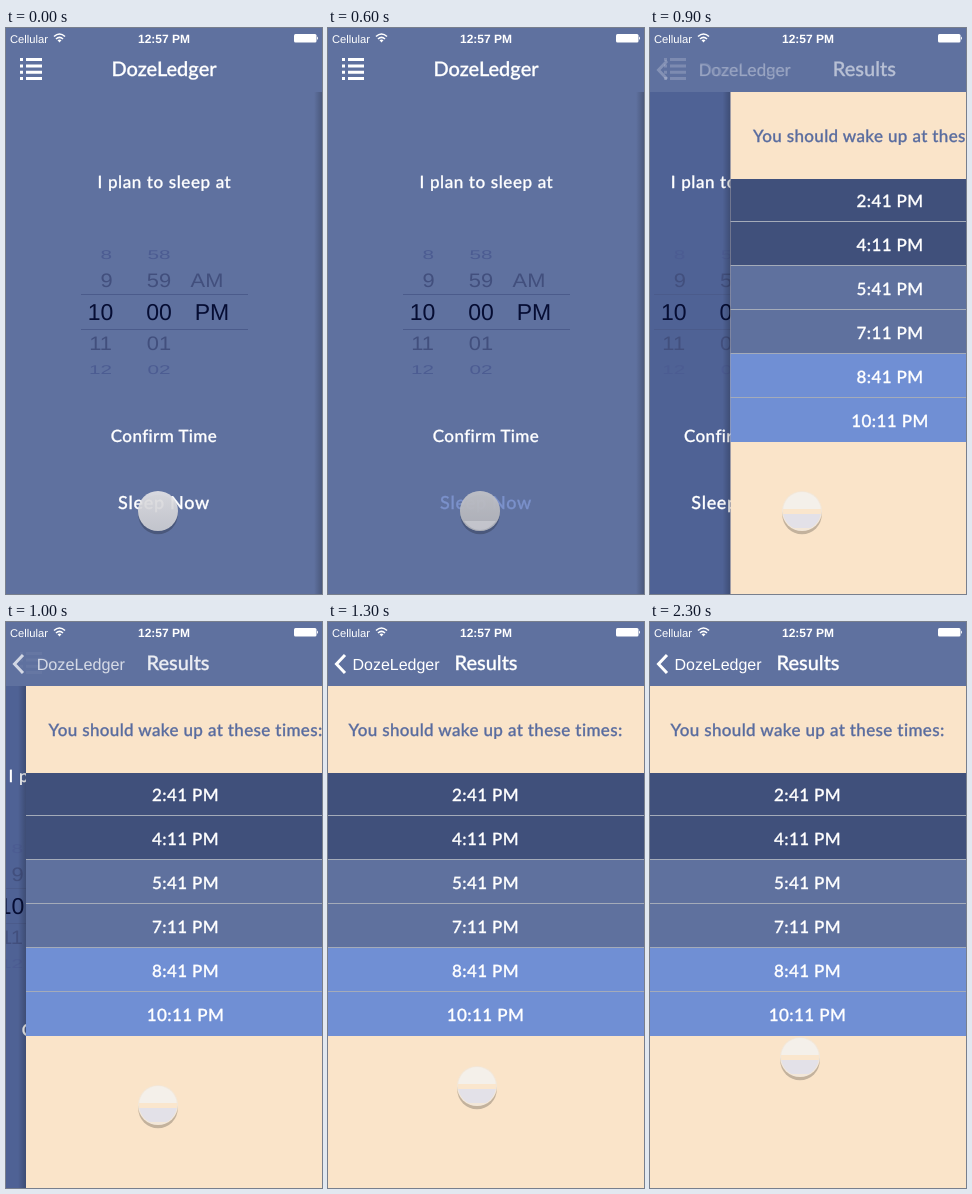
These frames come from a looping animation (316 px wide and 566 px high, 2.4 s). An HTML page:

```html
<!DOCTYPE html>
<html lang="en">
<head>
<meta charset="utf-8">
<title>Sleep planner</title>
<style>
html, body { margin: 0; width: 100%; height: 100%; overflow: hidden; background: #5f719f; }
svg { display: block; width: 316px; height: 566px; }
text { font-family: "Liberation Sans", Arial, sans-serif; text-rendering: geometricPrecision; }
.mid { text-anchor: middle; }
.geo { font: 500 17px Lato, sans-serif; fill: #fff; stroke: #fff; stroke-width: .3px; text-anchor: middle; }
.big { font-size: 20px; }
.heading { fill: #596c9f; stroke: #596c9f; letter-spacing: .36px; }
</style>
</head>
<body>
<svg viewBox="0 0 316 566">
  <defs>
    <linearGradient id="edge"><stop stop-opacity="0"/><stop offset="1" stop-opacity=".22"/></linearGradient>
    <linearGradient id="knob" x2="0" y2="1">
      <stop stop-color="#e6e5e7"/><stop offset=".6" stop-color="#d8d8dc"/><stop offset="1" stop-color="#cfd0d5"/>
    </linearGradient>
    <clipPath id="round"><circle r="19"/></clipPath>
  </defs>

  <rect id="planBack" width="316" height="566"/>
  <g id="plan">
    <text class="geo" x="158.5" y="160" letter-spacing=".6">I plan to sleep at</text>
    <path d="M75 266.5H242M75 301.5H242" stroke="#4b5b8b"/>
    <g id="picker"></g>
    <text class="geo" x="158" y="414" letter-spacing=".4">Confirm Time</text>
    <text class="geo" id="sleepNow" x="158" y="481" style="font-size:18px" letter-spacing=".7">Sleep Now</text>
  </g>

  <g id="results">
    <rect x="-8" y="64" width="8" height="502" fill="url(#edge)"/>
    <rect y="64" width="320" height="502" fill="#fae4c9"/>
    <g id="rows"></g>
    <g id="labels"><text class="geo heading" x="157.5" y="114">You should wake up at these times:</text></g>
  </g>

  <rect width="316" height="64" fill="#5f719f"/>
  <path id="menu" stroke="#fff" stroke-width="3"
    d="M14 31.5h3m3 0h16M14 38h3m3 0h16M14 44.3h3m3 0h16M14 50.5h3m3 0h16"/>
  <path id="chevron" d="M17 33L8.5 42L17 51" fill="none" stroke="#fff" stroke-width="3"/>
  <text id="title" class="geo big">DozeLedger</text>
  <text id="back" class="mid" font-size="16" fill="#fff">DozeLedger</text>
  <text id="resultsTitle" class="geo big" y="48">Results</text>

  <g fill="#fff">
    <text x="4" y="14.5" font-size="11.2">Cellular</text>
    <text class="mid" x="158" y="14.5" font-size="12" font-weight="bold">12:57 PM</text>
    <path d="M48 8.5q5.5-5 11 0M50 11q3.5-3.2 7 0" fill="none" stroke="#fff" stroke-width="1.6"/>
    <path d="M51.5 12.2q2-1.6 4 0l-2 2.2z"/>
    <rect x="288" y="6" width="22.5" height="8.5" rx="1.5"/>
    <path d="M311 8.5q2 1.7 0 3.5z"/>
  </g>

  <g id="touch">
    <circle cy="3.5" r="19.8" opacity=".22"/>
    <g id="pressed">
      <circle r="20" fill="url(#knob)" opacity=".9"/>
      <circle id="shade" r="20" fill="#70747f"/>
      <path id="pressGlint" d="M-16 10H16Q9 19 0 19T-16 10" fill="#dddee4"/>
    </g>
    <g id="light">
      <circle r="20" fill="#f3e7d8"/>
      <g clip-path="url(#round)">
        <rect x="-20" y="-20" width="40" height="18" fill="#f4f0ea"/>
        <rect x="-20" y="-2" width="40" height="5" fill="#fae6cd"/>
        <rect x="-20" y="3" width="40" height="14" fill="#e3e1e8"/>
      </g>
    </g>
  </g>
</svg>
<script>
const $ = id => document.getElementById(id);
const set = (id, attrs) => { for (const k in attrs) $(id).setAttribute(k, attrs[k]); };
const clamp = v => Math.max(0, Math.min(1, v));

// Wheel rows: hour, minute, half of day, baseline, width and height scale, colour
const wheel = [
  ["8", "58", "", 231, .9, .55, "#4c5c92"],
  ["9", "59", "AM", 258.5, .95, .85, "#424f7d"],
  ["10", "00", "PM", 292, 1, 1, "#060d33"],
  ["11", "01", "", 322, .95, .85, "#424f7d"],
  ["12", "02", "", 345.5, .9, .55, "#4c5c92"]
];
$("picker").innerHTML = wheel.map(([hour, minute, half, y, sx, sy, color]) => {
  const cell = (text, x) =>
    `<text class="mid" font-size="23" fill="${color}" transform="translate(${x} ${y}) scale(${sx} ${sy})">${text}</text>`;
  const left = (1 - sx) * 100;
  return cell(hour.length > 1 ? hour : "\u2007" + hour, 94.5) + cell(minute, 153) + cell(half, 206 - left);
}).join("");

const times = ["2:41", "4:11", "5:41", "7:11", "8:41", "10:11"];
const shades = ["#40507b", "#5f719e", "#708fd4"];
times.forEach((time, i) => {
  const y = 150 + 44 * i;
  $("rows").innerHTML += `<rect y="${i ? y : 151}" width="320" height="${i ? 44 : 43}" fill="${shades[i >> 1]}"/>` +
    (i ? `<path d="M0 ${y - .5}H320" stroke="#a4abb9"/>` : "");
  $("labels").innerHTML += `<text class="geo" x="157.5" y="${y + 29}" letter-spacing=".4">${time} PM</text>`;
});

const slide = [259, 80.5, 20, 5, 1, 0];

function draw(t) {
  const pushing = t >= 800;
  const x = pushing ? slide[Math.min(5, (t - 800) / 100)] : 316;
  const p = 1 - x / 316;
  const press = pushing ? 0 : clamp((t - 200) / 400);

  set("planBack", { fill: !pushing ? "#5f719f" : t < 900 ? "#526da8" : "#4f6295" });
  set("plan", { transform: `translate(${-95 * p})` });
  const ink = [123, 145, 203].map(c => Math.round(255 + (c - 255) * press));
  $("sleepNow").style.fill = $("sleepNow").style.stroke = `rgb(${ink})`;
  set("results", { transform: `translate(${x})` });
  set("labels", { transform: `translate(${x ? 2 : 0})` });

  const center = 158 - 90 * p ** 1.2, leaving = 1 - p ** .7, arriving = p ** 5;
  set("menu", { opacity: leaving });
  set("chevron", { opacity: arriving });
  set("title", { opacity: leaving, transform: `translate(${center} 48) scale(${1 - .17 * p})` });
  set("back", { opacity: arriving, transform: `translate(${center} 48) scale(${1 + .21 * (1 - p)})` });
  set("resultsTitle", { opacity: p * p, x: 158 + .7 * x });

  const lift = clamp((t - 1100) / 200), rise = clamp((t - 1900) / 400);
  set("touch", { transform: `translate(${152 - 3 * lift + rise} ${483 - 19 * lift - 29 * rise})` });
  set("pressed", { opacity: t < 900 ? 1 : 0 });
  set("shade", { opacity: .28 * press });
  set("pressGlint", { opacity: .45 * press });
  set("light", { opacity: t < 900 ? 0 : 1 });
}

function tick() {
  draw(Math.floor(performance.now() % 2400 / 100) * 100);
  requestAnimationFrame(tick);
}
tick();
</script>
</body>
</html>
```
